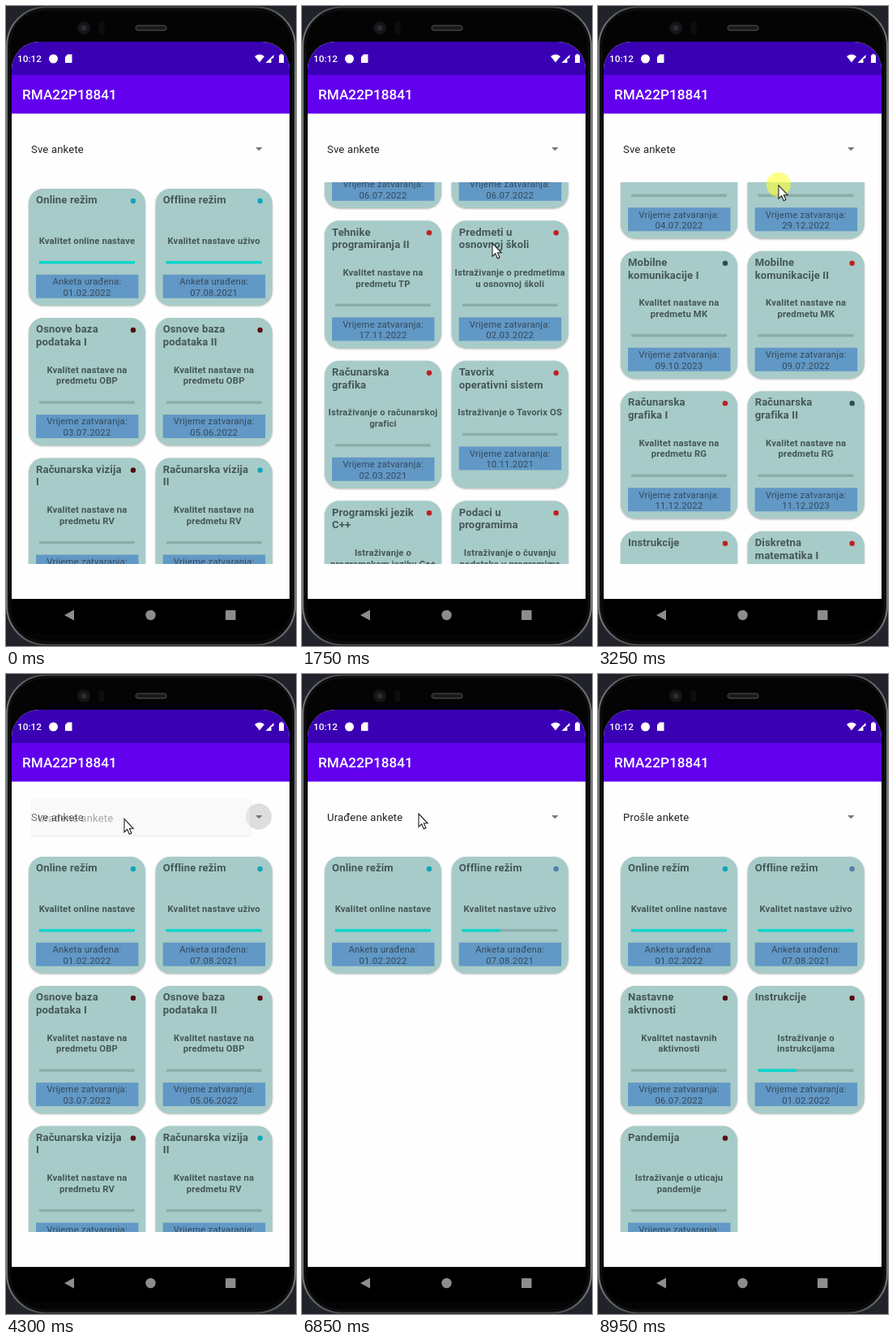
An HTML page that plays this animation: 358x788 px, repeating every 9450 ms.

```html
<!DOCTYPE html>
<html lang="bs">
<head>
<meta charset="utf-8">
<title>Ankete</title>
<style>
html, body { margin: 0; width: 100%; height: 100%; overflow: hidden; background: #22232a; }
svg { display: block; width: 358px; height: 788px; font-family: Roboto, sans-serif; }
.title { font-weight: 700; font-size: 13.1px; letter-spacing: .13px; fill: #445759; }
.desc { font-weight: 700; font-size: 11.35px; letter-spacing: .14px; fill: #445759; text-anchor: middle; }
.date { font-size: 11.35px; letter-spacing: .2px; fill: #35495a; text-anchor: middle; }
.item { font-size: 13.1px; letter-spacing: .17px; fill: #222; }
.bar { font-weight: 500; fill: #fff; }
.card { fill: #a7cbc8; filter: drop-shadow(0 1.5px 1px rgba(0,0,0,.3)); }
#panel { fill: #f2f2f2; filter: drop-shadow(0 1px 1.5px rgba(0,0,0,.22)); }
</style>
</head>
<body>
<svg viewBox="0 0 358 788">
  <defs>
    <linearGradient id="rim">
      <stop offset="0" stop-color="#6f7674"/><stop offset=".14" stop-color="#3f4343"/>
      <stop offset=".86" stop-color="#3f4343"/><stop offset="1" stop-color="#6f7674"/>
    </linearGradient>
    <clipPath id="listClip"><rect x="20" y="217" width="318" height="470"/></clipPath>
    <clipPath id="popClip"><rect id="popMask" x="26" y="154" width="282"/></clipPath>
  </defs>
  <!-- phone -->
  <rect x="1" y="1.500" width="356" height="785" rx="48" fill="#08080a" stroke="url(#rim)" stroke-width="2.200"/>
  <rect x="4" y="5" width="350" height="778" rx="44" fill="#040405" stroke="#151618"/>
  <circle cx="96" cy="27" r="8" fill="#141517"/><circle cx="96" cy="27" r="3.500" fill="#282b30"/>
  <ellipse cx="118" cy="27" rx="4" ry="8" fill="#0c0d0e"/>
  <rect x="160" y="24" width="38" height="6" rx="3" fill="#1b1b1c" stroke="#555"/>
  <path d="M7 730V78a34 34 0 0 1 34-34H316a34 34 0 0 1 34 34V730z" fill="#fefefe"/>
  <path d="M7 85V78a34 34 0 0 1 34-34H316a34 34 0 0 1 34 34V85z" fill="#3a00b4"/>
  <rect x="7" y="85" width="343" height="47.500" fill="#6200ee"/>
  <path d="M7 730H350V742a31 31 0 0 1-31 31H38a31 31 0 0 1-31-31z" fill="#000"/>
  <!-- status bar -->
  <text class="bar" x="14" y="69" font-size="11.8">10:12</text>
  <g fill="#fff">
    <circle cx="58.5" cy="65" r="5.5"/>
    <path d="M76 59.5h5.5v10.5h-8.5v-7.5z"/>
    <path d="M307 62q6-5 12 0l-6 7.5z"/>
    <path d="M320.500 70l10-10v4l-3 1v5z"/>
    <path d="M337 60.500h1.700v-1.500h2.600v1.500h1.700v9.500h-6z"/>
  </g>
  <text class="bar" x="20" y="115" font-size="17.2">RMA22P18841</text>
  <!-- navigation -->
  <g fill="#8d8d8d">
    <path d="M72 750l12-6.500v13z"/><circle cx="178.500" cy="750" r="6.200"/>
    <rect x="271" y="744" width="12.500" height="12" rx="1"/>
  </g>
  <!-- filter -->
  <circle id="ripple" cx="312" cy="175.500" r="16" fill="#dedede"/>
  <text id="filter" class="item" x="31" y="180.700"></text>
  <path d="M308 174h8.500l-4.250 4.300z" fill="#757575"/>
  <g id="list" clip-path="url(#listClip)"></g>
  <g id="popup">
    <rect id="panel" x="32" y="154" width="270"/>
    <g clip-path="url(#popClip)"><g id="items"></g></g>
  </g>
  <circle id="press" cy="-1" r="15" fill="#ffff38" opacity=".62"/>
  <path id="cursor" d="M0 0V16.200L3.700 12.800L6.300 18.800L9 17.600L6.400 11.800H11.200z" fill="#fff" stroke="#222" stroke-width="1.100"/>
</svg>
<script>
const $ = id => document.getElementById(id);
const LOOP = 9450;
const RED = '#bd2020', DARK = '#560a10', CYAN = '#10a5bd', BLUE = '#557fa8', SLATE = '#2b4c58';
const FILTERS = ['Sve moje ankete', 'Sve ankete', 'Urađene ankete', 'Buduće ankete', 'Prošle ankete'];

// title, description (| breaks a line), date, dot, progress
const about = s => 'Istraživanje o ' + s;
const course = s => 'Kvalitet nastave na|predmetu ' + s;
const card = (title, desc, date, dot = RED, progress = 0) => ({ title, desc, date, dot, progress });
const online = card('Online režim', 'Kvalitet online nastave', '01.02.2022', CYAN, 1);
const offline = card('Offline režim', 'Kvalitet nastave uživo', '07.08.2021', CYAN, 1);
const activity = card('Nastavne|aktivnosti', 'Kvalitet nastavnih|aktivnosti', '06.07.2022', DARK);
const lessons = card('Instrukcije', about('|instrukcijama'), '01.02.2022', RED, .4);
const pandemic = card('Pandemija', about('uticaju|pandemije'), '14.03.2021', DARK);

const all = [
  online, offline,
  card('Osnove baza|podataka I', course('OBP'), '03.07.2022', DARK),
  card('Osnove baza|podataka II', course('OBP'), '05.06.2022', DARK),
  card('Računarska vizija|I', course('RV'), '04.07.2022', DARK),
  card('Računarska vizija|II', course('RV'), '29.12.2022', CYAN),
  card('Mobilne|komunikacije I', course('MK'), '09.10.2023', SLATE),
  card('Mobilne|komunikacije II', course('MK'), '09.07.2022'),
  card('Računarska|grafika I', course('RG'), '11.12.2022'),
  card('Računarska|grafika II', course('RG'), '11.12.2023', SLATE),
  lessons,
  card('Diskretna|matematika I', course('DM'), '05.07.2022'),
  card('Diskretna|matematika II', course('DM'), '06.07.2022'),
  card('Tehnike|programiranja I', course('TP'), '06.07.2022'),
  card('Tehnike|programiranja II', course('TP'), '17.11.2022'),
  card('Predmeti u|osnovnoj školi', about('predmetima|u osnovnoj školi'), '02.03.2022'),
  card('Računarska|grafika', about('računarskoj|grafici'), '02.03.2021'),
  card('Tavorix|operativni sistem', about('Tavorix OS'), '10.11.2021'),
  card('Programski jezik|C++', about('|programskom jeziku C++'), '02.02.2021'),
  card('Podaci u|programima', about('čuvanju|podataka u programima'), '22.12.2020'),
  card('Mobilne igre', about('mobilnim|igrama'), '22.03.2022'),
  card('Unapređenje|školovanja', about('unapređenju|školovanja'), '22.03.2021'),
  card('Komunikacione|vještine', about('|vještinama'), '12.04.2022'),
  card('Finansijska|pismenost', about('finansijskoj|pismenosti'), '18.05.2021'),
  activity, pandemic
];
const views = {
  1: all,
  0: [activity],
  2: [online, { ...offline, dot: BLUE, progress: .4 }],
  4: [online, { ...offline, dot: BLUE }, activity, { ...lessons, dot: DARK }, pandemic]
};

const text = (cls, x, y, s) => `<text class="${cls}" x="${x}" y="${y}">${s.trim()}</text>`;
const lines = (cls, x, y, step, s) => s.split('|').map((l, i) => text(cls, x, y + i * step, l)).join('');
const rect = (x, y, w, h, fill) => `<rect x="${x}" y="${y}" width="${w}" height="${h}" fill="${fill}"/>`;

function cardSvg(c, x, y, h) {
  const low = c.desc.includes('|') ? 13.4 : 0, mid = x + 72;
  const label = c.title.endsWith('režim') ? 'Anketa urađena:' : 'Vrijeme zatvaranja:';
  return `<rect class="card" x="${x}" y="${y}" width="144" height="${h}" rx="18"/>`
    + lines('title', x + 9, y + 18.3, 15.6, c.title)
    + `<circle cx="${x + 129}" cy="${y + 15}" r="3.2" fill="${c.dot}"/>`
    + lines('desc', mid, y + 67.7, 13.6, c.desc)
    + rect(x + 13, y + 89 + low, 118, 3.4, '#8cacaa')
    + rect(x + 13, y + 89 + low, 118 * c.progress, 3.4, '#00d8cc')
    + rect(x + 9, y + 105.7 + low, 126.5, 29, '#6198c5')
    + lines('date', mid, y + 118 + low, 13.7, label + '|' + c.date);
}

function viewSvg(cards) {
  let y = 225, out = '';
  for (let i = 0; i < cards.length; i += 2) {
    const pair = cards.slice(i, i + 2);
    const h = pair.some(c => c.desc.includes('|')) ? 157 : 143.5;
    pair.forEach((c, k) => out += cardSvg(c, 28 + k * 156.7, y, h));
    y += h + 15.5;
  }
  return out;
}

const groups = {};
for (const key in views) {
  $('list').insertAdjacentHTML('beforeend', `<g>${viewSvg(views[key])}</g>`);
  groups[key] = $('list').lastElementChild;
}
$('items').innerHTML = FILTERS.map((s, i) => text('item', 39, 181.7 + i * 40, s)).join('');

const clamp = v => Math.max(0, Math.min(1, v));
const linear = u => u;
const out = u => 1 - (1 - u) * (1 - u);
const smooth = u => u * u * (3 - 2 * u);

// Each step: time, values..., easing towards it
function track(steps, t) {
  let i = steps.findIndex(s => s[0] > t);
  if (i < 0) i = steps.length;
  const a = steps[Math.max(0, i - 1)], b = steps[Math.min(i, steps.length - 1)];
  const ease = b[b.length - 1], u = b === a ? 0 : ease(clamp((t - a[0]) / (b[0] - a[0])));
  return a.slice(1, -1).map((v, k) => v + (b[k + 1] - v) * u);
}

const scroll = [
  [550, 0, linear], [750, 370, linear], [1400, 720, out], [1450, 720, linear],
  [1650, 1038, linear], [1750, 1153.5, linear], [2250, 1478, out], [2350, 1484, out],
  [2550, 1160, linear], [3200, 429.3, out], [3250, 429.3, linear],
  [3400, 140, linear], [3700, 0, out]
];
const pointer = [
  [200, -14, 775, linear], [550, 180, 672, smooth], [750, 236, 302, linear], [950, 236, 302, linear],
  [1400, 195, 610, smooth], [1450, 195, 610, linear], [1650, 235, 292, linear], [1750, 235, 292, linear],
  [2250, 219, 281, smooth], [2350, 219, 276, linear], [2550, 202, 600, linear], [2650, 202, 604, linear],
  [3100, 223, 219, smooth], [3250, 223, 219, linear], [3400, 212, 508, linear], [3550, 212, 512, linear],
  [4000, 146, 180, smooth], [4400, 146, 178, linear], [4650, 120, 182, smooth], [4800, 120, 182, linear],
  [5000, 138, 175, smooth], [6050, 138, 175, linear], [6300, 112, 258, smooth], [6500, 112, 258, linear],
  [6850, 144, 172, smooth], [7250, 144, 172, linear], [7600, 128, 312, smooth], [7800, 128, 312, linear],
  [7950, 112, 338, smooth], [8150, 112, 338, linear], [8700, 316, 729, smooth], [8750, 316, 735, linear],
  [8950, 322, 800, linear]
];
const presses = [[550, 750], [1450, 1650], [2350, 2550], [3200, 3400], [4150, 4250], [4650, 4750],
  [5350, 5450], [6350, 6450], [7100, 7200], [8000, 8100]];
// popup opening, choice made, filter chosen
const picks = [[4250, 4750, 0], [5450, 6450, 2], [7200, 8100, 4]];

function draw(t) {
  let filter = 1, open = 0, alpha = 0, ripple = 0;
  for (const [start, end, choice] of picks) {
    if (t >= end) filter = choice;
    if (t >= start && t < end + 120) {
      open = clamp((t - start) / 250);
      alpha = Math.min(open * 1.95, 1 - clamp((t - end) / 120));
    }
    const r = t - start + 80;
    if (r > 0 && r < 380) ripple = Math.min(1, r / 80, (380 - r) / 130);
  }
  for (const key in groups) groups[key].style.display = +key === filter ? '' : 'none';
  groups[1].setAttribute('transform', `translate(0 ${-track(scroll, t)[0]})`);
  $('filter').textContent = FILTERS[filter];
  $('ripple').setAttribute('opacity', ripple);

  const h = 207 * open + 3 * (1 - open);
  $('popup').setAttribute('opacity', alpha);
  $('panel').setAttribute('height', h);
  $('popMask').setAttribute('height', h);
  $('items').setAttribute('transform', `translate(0 ${-100 * (1 - open)})`);

  const at = `translate(${track(pointer, t).join(' ')})`;
  $('cursor').setAttribute('transform', at);
  $('press').setAttribute('transform', at);
  $('press').style.display = presses.some(([a, b]) => t >= a && t < b) ? '' : 'none';
}

const begin = performance.now();
function tick() {
  draw((performance.now() - begin) % LOOP);
  requestAnimationFrame(tick);
}
tick();
</script>
</body>
</html>
```
